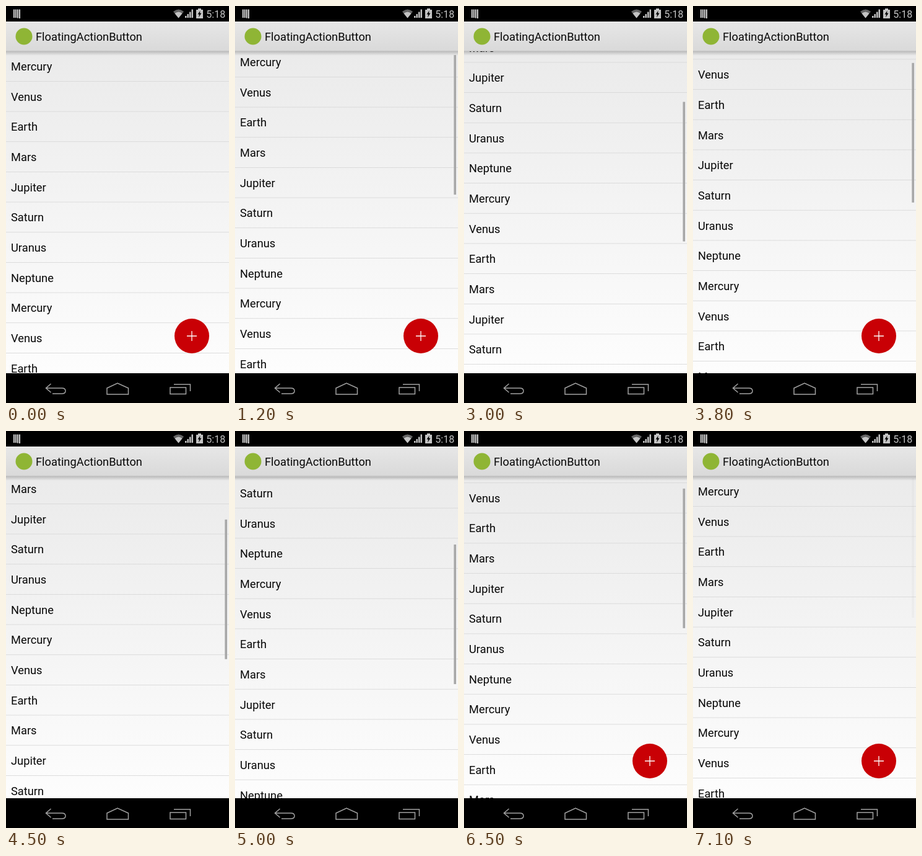
Recreate the animation shown at these times as an HTML page. Size 360 px wide and 640 px high, loop 7.2 s.

```html
<!DOCTYPE html>
<html lang="en">
<head>
<meta charset="utf-8">
<title>Planet list</title>
<style>
html, body { margin: 0; width: 100%; height: 100%; overflow: hidden; background: #000; }
svg { display: block; width: 360px; height: 640px; }
text { font: 18.3px Roboto, sans-serif; fill: #080808; }
.clock { font-size: 16px; fill: #c4c4c4; }
.nav { fill: none; stroke: #a2a2a2; stroke-width: 1.5; }
</style>
</head>
<body>
<svg viewBox="0 0 360 640">
  <defs>
    <linearGradient id="page" x2="0" y2="1">
      <stop stop-color="#e9e9e9"/><stop offset="1" stop-color="#fdfdfd"/>
    </linearGradient>
    <linearGradient id="bar" x2="0" y2="1">
      <stop stop-color="#e7e7e7"/><stop offset="1" stop-color="#d9d9d9"/>
    </linearGradient>
    <linearGradient id="shade" x2="0" y2="1">
      <stop stop-opacity=".2"/><stop offset="1" stop-opacity="0"/>
    </linearGradient>
  </defs>

  <rect y="25" width="360" height="567" fill="url(#page)"/>
  <g id="list"></g>
  <rect id="thumb" x="353.3" width="3.7" height="225" fill="#a9a9a9"/>
  <g id="fab">
    <circle cx="300" cy="532" r="28" fill="#c90005"/>
    <path d="M292 532H308M300 524V540" stroke="#fff" stroke-width="1.3"/>
  </g>

  <rect y="73" width="360" height="7" fill="url(#shade)"/>
  <rect y="25" width="360" height="48" fill="url(#bar)"/>
  <rect y="72" width="360" height="1" fill="#c6c6c6"/>
  <circle cx="29" cy="49" r="13.5" fill="#8fb535"/>
  <text x="48" y="56">FloatingActionButton</text>

  <rect width="360" height="25"/>
  <path d="M13 5.5V19M16 5.5V19M19 5.5V19.5M22 5.5V20" stroke="#d5d5d5" stroke-width="2"/>
  <path d="M270 9Q278.500 2 287 9L278.500 19.500Z" fill="#666"/>
  <path d="M272.500 12Q278.500 7 284.500 12L278.500 19.500Z" fill="#c4c4c4"/>
  <path d="M289 19V16H291.500V19ZM292.500 19V13H295V19ZM296 19V9.500H298.500V19ZM299.500 19V5.500H302V19Z" fill="#c4c4c4"/>
  <path d="M307 6H310V4H315V6H318V20H307Z" fill="#c4c4c4"/>
  <path d="M313.500 7.500L309.500 13.500H312L311 18.500L315.500 11.500H313Z"/>
  <text class="clock" x="323.300" y="18.500">5:18</text>

  <rect y="592" width="360" height="48"/>
  <g class="nav">
    <path d="M72.500 609L64.500 616L72.500 623M65 616H90Q96 616 96 620.500T90 625H75"/>
    <path d="M163 626V616L180 608L197.500 616V626Z"/>
    <path d="M265 615H290.500V625.500H265ZM271 610H297.500V621"/>
  </g>
</svg>
<script>
const LOOP = 7200, STEP = 100, TOP = 73, PITCH = 48 + 2 / 3;
const planets = ["Mercury", "Venus", "Earth", "Mars", "Jupiter", "Saturn", "Uranus", "Neptune"];
const [list, thumb, fab] = ["list", "thumb", "fab"].map(id => document.getElementById(id));

list.innerHTML = Array.from({ length: 20 }, (_, i) => {
  const y = TOP + i * PITCH;
  return `<text x="8" y="${y + 31}">${planets[i % 8]}</text>` +
    `<rect y="${y + 48}" width="360" height=".8" fill="#d6d6d6"/>`;
}).join("");

// time, scroll position
const keys = [
  [0, 0], [1100, 0], [1200, 7], [1500, 65], [2100, 164], [2600, 188], [2900, 186],
  [3400, 80], [3800, 35.5], [4100, 35.5], [4500, 150], [5000, 240.5], [5500, 247],
  [6000, 247], [6300, 110], [6700, 0], [LOOP, 0]
];
const clamp = x => Math.min(1, Math.max(0, x));
const ease = x => (1 - Math.cos(Math.PI * clamp(x))) / 2;
const slope = i => (keys[i + 1][1] - keys[i][1]) / (keys[i + 1][0] - keys[i][0]);

// harmonic mean keeps the curve from overshooting; flat at turning points
function tangent(i) {
  if (i === 0 || i === keys.length - 1) return 0;
  const a = slope(i - 1), b = slope(i);
  return a * b > 0 ? 2 * a * b / (a + b) : 0;
}

function scrollAt(t) {
  const i = keys.findIndex((k, n) => t < keys[n + 1][0]);
  const [t0, s0] = keys[i], [t1, s1] = keys[i + 1];
  const d = t1 - t0, u = (t - t0) / d, v = 1 - u;
  return s0 * (1 + 2 * u) * v * v + s1 * (3 - 2 * u) * u * u +
    d * u * v * (tangent(i) * v - tangent(i + 1) * u);
}

function draw(now) {
  const t = Math.floor(now % LOOP / STEP) * STEP;
  const s = scrollAt(t);
  const slide = start => ease((t - start) / 200);
  const hidden = slide(1300) - slide(3000) + slide(4200) - slide(6100);
  list.setAttribute("transform", `translate(0 ${-s})`);
  fab.setAttribute("transform", `translate(0 ${88 * hidden})`);
  thumb.setAttribute("y", 76 + 0.445 * s);
  thumb.setAttribute("opacity", t < 1200 ? 0 : clamp((7120 - t) / 250));
}

let start;
function frame(now) {
  start ??= now;
  draw(now - start);
  requestAnimationFrame(frame);
}
draw(0);
requestAnimationFrame(frame);
</script>
</body>
</html>
```
